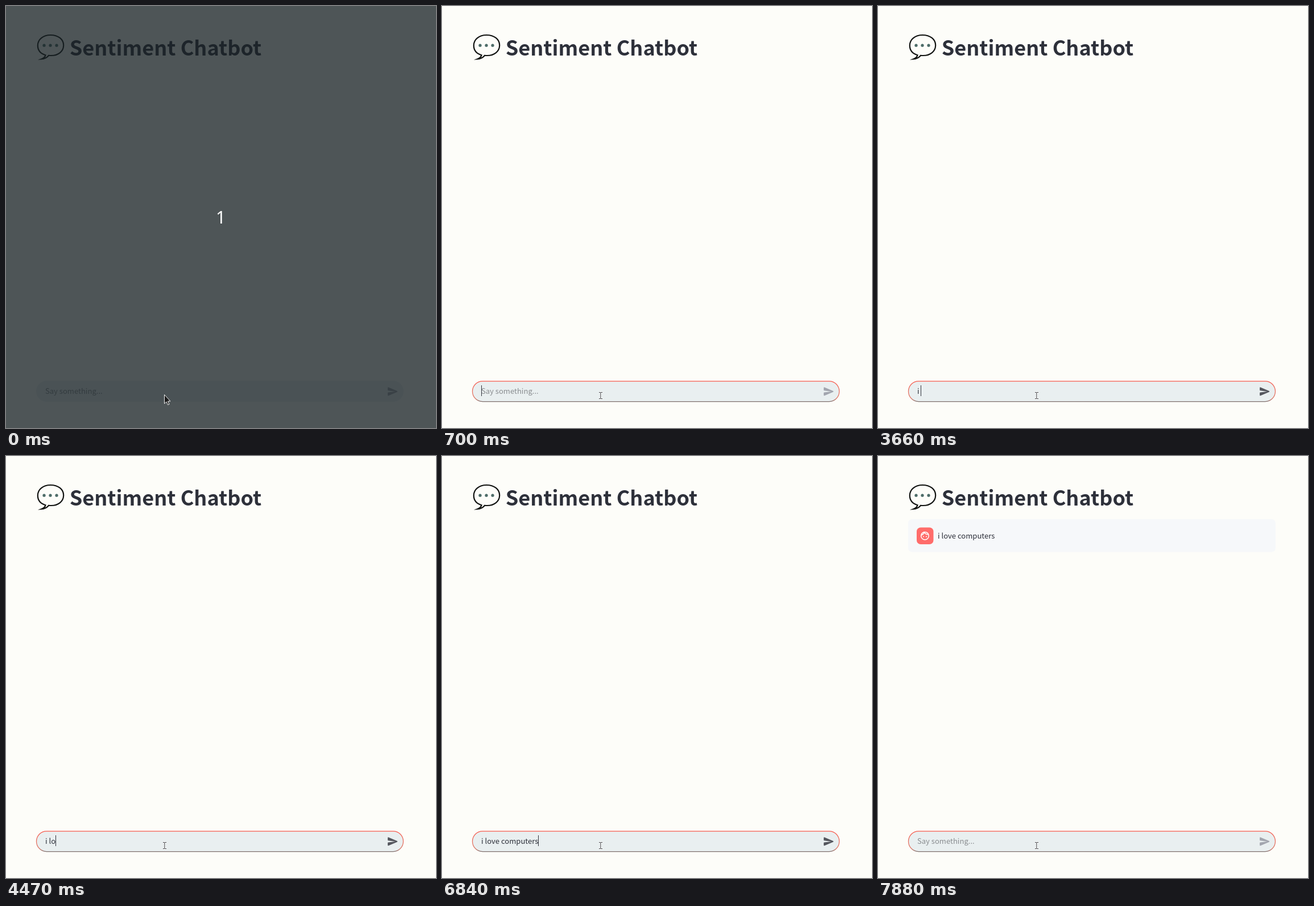
An HTML page with a canvas that plays this animation: 756 px wide and 741 px high, repeating every 8 s.

```html
<!DOCTYPE html>
<html lang="en">
<head>
<meta charset="utf-8">
<title>Sentiment Chatbot</title>
<style>
  html, body { margin: 0; width: 100%; height: 100%; overflow: hidden; background: #fdfdf9; }
  canvas { display: block; }
</style>
</head>
<body>
<canvas id="stage" width="756" height="741"></canvas>
<script>
const ctx = document.getElementById('stage').getContext('2d');
const LOOP = 8000;
const SANS = '"Noto Sans CJK SC", "Noto Sans CJK JP", "Noto Sans CJK", "Open Sans", sans-serif';
const BODY = '13.05px ' + SANS;
const TITLE = 'bold 36.1px ' + SANS;
const PAGE = '#fdfdf9';
const INK = '#2d303a';
const FOCUS = 420, SUBMIT = 7430, REPLY = 7500;

// Each entry: time, content of the input box
const typing = [
  [0, ''], [2130, 'i'], [2550, 'i '], [2610, 'i c'], [2660, 'i co'], [2720, 'i con'],
  [3520, 'i c'], [3660, 'i '], [4290, 'i l'], [4470, 'i lo'], [4710, 'i lov'],
  [4850, 'i love'], [4990, 'i love '], [5160, 'i love c'], [5370, 'i love co'],
  [5550, 'i love com'], [5760, 'i love comp'], [6000, 'i love compu'],
  [6420, 'i love compute'], [6590, 'i love computer'], [6670, 'i love computers'],
  [SUBMIT, '']
];
const caretOff = [[980, 1600], [3310, 3520], [SUBMIT, LOOP]];

const sendIcon = new Path2D('M3.4 20.4l17.45-7.48a1 1 0 000-1.84L3.4 3.6a.993.993 0 00-1.39.91L2 9.12c0 .5.37.93.87.99L17 12 2.87 13.88c-.5.07-.87.5-.87 1l.01 4.61c0 .71.73 1.2 1.39.91z');
const bubble = new Path2D('M69.5 86.2C60.5 83.5 55.8 77 55.8 69.2C55.8 58.5 65.5 51 78.3 51C91.5 51 101.2 58.3 101.2 69C101.2 79.8 91.5 87 79.5 87C77.6 87 76.4 87 75.2 86.8C72 90.8 68 93 62 93.2C66 91.6 68.8 89.4 69.5 86.2Z');
const arrow = new Path2D('M278.5 682.5V698.2L282 694.9L284.6 700.4L287 699.3L284.5 694H289Z');
const beam = new Path2D('M276 678.5H278.2L278.8 679L279.4 678.5H282M278.8 679V689M276 689.5H278.2L278.8 689L279.4 689.5H282');

function text(str, x, y, font, color, align = 'left') {
  ctx.font = font;
  ctx.fillStyle = color;
  ctx.textAlign = align;
  ctx.fillText(str, x, y);
}

function box(x, y, w, h, r, fill) {
  ctx.beginPath();
  ctx.roundRect(x, y, w, h, r);
  if (fill) {
    ctx.fillStyle = fill;
    ctx.fill();
  }
}

function dot(x, y, r, color) {
  ctx.beginPath();
  ctx.arc(x, y, r, 0, Math.PI * 2);
  ctx.fillStyle = color;
  ctx.fill();
}

function line(path, color, width) {
  ctx.strokeStyle = color;
  ctx.lineWidth = width;
  ctx.stroke(path);
}

function drawHeader() {
  ctx.fillStyle = PAGE;
  ctx.fill(bubble);
  line(bubble, '#121412', 2.2);
  for (const x of [67, 78, 89]) dot(x, 69.2, 2.6, '#4d6c68');
  text('Sentiment Chatbot', 111.7, 87, TITLE, INK);
}

function drawMessage() {
  box(53, 111, 646, 57.5, 7, '#f6f8fa');
  box(68, 125.5, 29.5, 29.5, 7, '#ff6c6a');
  line(new Path2D('M75.7 140.2a6.8 6.8 0 1 0 13.6 0a6.8 6.8 0 1 0-13.6 0'), '#fff', 1.5);
  line(new Path2D('M76 139C79 138.2 80.6 136.6 81.2 134C83 136.8 85.6 138 89 137.6'), '#fff', 1.4);
  dot(80, 141.4, 1, '#fff');
  dot(85, 141.4, 1, '#fff');
  text('i love computers', 105, 145, BODY, INK);
}

function drawInput(t) {
  const value = typing.filter(k => k[0] <= t).pop()[1];
  box(53, 658, 646, 37, 18.5, '#e9eff0');

  const focus = Math.max(0, Math.min(1, (t - FOCUS) / 280));
  if (focus) {
    const edge = ctx.createLinearGradient(0, 658, 0, 695);
    edge.addColorStop(0, '#fb5c4e');
    edge.addColorStop(0.85, '#dc7968');
    edge.addColorStop(1, '#77706f');
    ctx.globalAlpha = focus;
    box(53.5, 658.8, 645, 35.7, 17.8);
    ctx.strokeStyle = edge;
    ctx.lineWidth = 1.25;
    ctx.stroke();
    ctx.globalAlpha = 1;
  }

  text(value || 'Say something...', 69, 681, BODY, value ? INK : '#8a8d90');

  if (t >= FOCUS && !caretOff.some(([a, b]) => t >= a && t < b)) {
    const x = Math.floor(69 + ctx.measureText(value).width);
    ctx.fillStyle = '#30333c';
    ctx.fillRect(x, 666, 1, 19);
  }

  ctx.save();
  ctx.translate(669.4, 666.4);
  ctx.scale(0.876, 0.876);
  ctx.fillStyle = value ? '#54565d' : '#a2a5ae';
  ctx.fill(sendIcon);
  ctx.restore();
}

function drawCountdown() {
  ctx.fillStyle = 'rgba(24, 33, 38, 0.76)';
  ctx.fillRect(0, 0, 756, 741);
  text('1', 377.5, 381.5, '30px "Noto Sans", "Open Sans", sans-serif', '#fff', 'center');
  ctx.fillStyle = '#1c1c1c';
  ctx.fill(arrow);
  line(arrow, '#f2f2f2', 1);
}

function draw(t) {
  ctx.fillStyle = PAGE;
  ctx.fillRect(0, 0, 756, 741);
  drawHeader();
  if (t >= REPLY) drawMessage();
  drawInput(t);
  if (t < 30) {
    drawCountdown();
  } else {
    line(beam, '#fff', 2.4);
    line(beam, '#3a3c40', 1);
  }
}

const start = performance.now();
function tick() {
  draw((performance.now() - start) % LOOP);
  requestAnimationFrame(tick);
}
draw(0);
requestAnimationFrame(tick);
</script>
</body>
</html>
```
